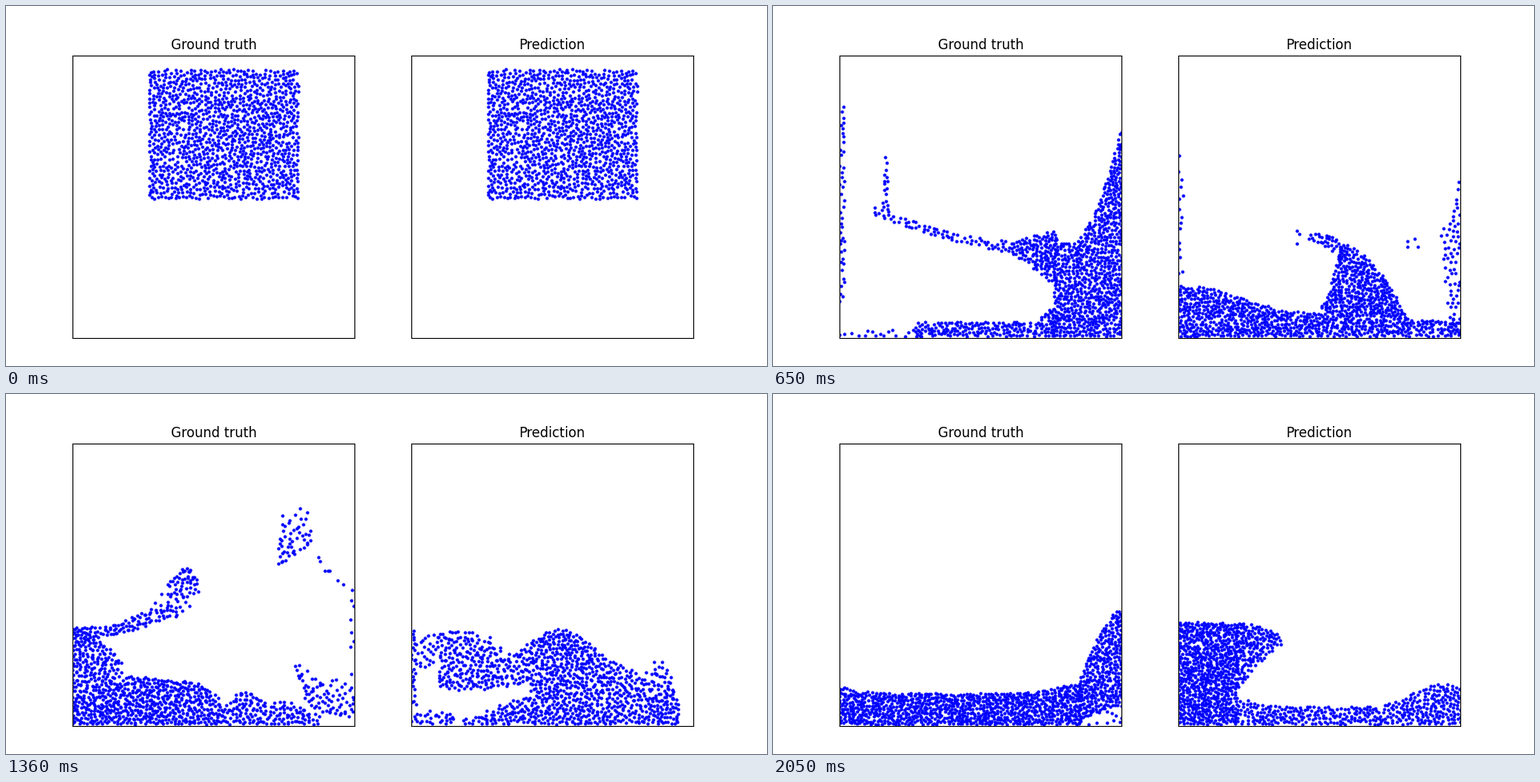
Write a matplotlib script that moves like this. It is 950 px wide and 450 px high and loops after 2100 ms.

```python
import numpy as np
import matplotlib.pyplot as plt
from matplotlib.animation import FuncAnimation

W, H, DPI = 950, 450, 100
SIDE, CEIL = 352.27, 62.36
FLOOR = CEIL + SIDE
BED = 413
COUNT = 1240
STEPS, LAST = 70, 68
GRAVITY = 1.0
rng = np.random.default_rng(7)


# A body of water is (density, x, top, bottom), sampled along x.
def slab(density, *pts):
    """Smooth curves through two or three (x, top, bottom) points."""
    px, top, bottom = np.array(pts, float).T
    x = np.linspace(px[0], px[-1], 200)
    curve = lambda y: np.polyval(np.polyfit(px, y, len(px) - 1), x)
    top = curve(top)
    return density, x, top, np.maximum(curve(bottom), top + 1)


def rect(density, x0, x1, top, bottom):
    return slab(density, (x0, top, bottom), (x1, top, bottom))


def sea(density, x0, x1, depth, *swells):
    """Water on the floor; each swell is (centre, width, rise)."""
    x = np.linspace(x0, x1, 200)
    rise = sum(r * np.exp(-((x - c) / w) ** 2) for c, w, r in swells)
    return density, x, BED - depth - rise, np.full_like(x, BED)


def area(body):
    _, x, top, bottom = body
    return (bottom - top).mean() * (x[-1] - x[0])


def scatter(body, n):
    """Throw n evenly spaced darts into a body."""
    _, x, top, bottom = body
    cdf = np.cumsum(bottom - top)
    u, v = rng.random((2, 8 * n + 8))
    px = np.interp(u, cdf / cdf[-1], x)
    hi, lo = np.interp(px, x, top), np.interp(px, x, bottom)
    darts = np.column_stack([px, hi + v * (lo - hi)])
    gap = 0.45 * area(body) / n
    out, k = np.empty((n, 2)), 0
    for d in darts:
        if k == n:
            break
        if k == 0 or ((out[:k] - d) ** 2).sum(1).min() > gap:
            out[k] = d
            k += 1
    out[k:] = darts[:n - k]
    return out


def fill(bodies):
    mass = np.array([b[0] * area(b) for b in bodies])
    n = np.maximum(1, np.round(COUNT * mass / mass.sum())).astype(int)
    n[mass.argmax()] += COUNT - n.sum()
    return np.vstack([scatter(b, k) for b, k in zip(bodies, n)])


def ranks(p):
    columns = np.array_split(np.argsort(p[:, 0]), 40)
    return np.concatenate([c[np.argsort(p[c, 1])] for c in columns])


def match(a, b):
    """Order b so that particles travel from a with few crossings."""
    out = np.empty_like(b)
    out[ranks(a)] = b[ranks(b)]
    for _ in range(1300):
        i, j = rng.permutation(COUNT).reshape(2, -1)
        cross = ((a[i] - a[j]) * (out[i] - out[j])).sum(1) < 0
        i, j = i[cross], j[cross]
        out[np.r_[i, j]] = out[np.r_[j, i]]
    return out


class Flow:
    def __init__(self, start):
        self.times, self.poses = [0], [start]

    def key(self, time, *bodies):
        self.times.append(time)
        self.poses.append(match(self.poses[-1], fill(bodies)))

    def at(self, t):
        k = min(np.searchsorted(self.times, t, "right"), len(self.times) - 1)
        t0, t1 = self.times[k - 1:k + 1]
        f = (t - t0) / (t1 - t0)
        x, y = (self.poses[k - 1] * (1 - f) + self.poses[k] * f).T
        # Airborne water follows a ballistic arc between poses.
        air = (FLOOR - y) / SIDE
        y = y - air * GRAVITY / 2 * (t - t0) * (t1 - t)
        return np.clip(x, 0, SIDE), np.clip(y, CEIL + 1, FLOOR)


block = fill([rect(1, 96, 282, 79, 241)])
truth, guess = Flow(block), Flow(block)
for flow in (truth, guess):
    flow.key(6, slab(1, (90, 64, 100), (220, 64, 170), (350, 66, 265)))

truth.key(
    13,
    slab(1, (200, 122, 162), (275, 120, 240), (352, 70, 385)),
    slab(.8, (75, 110, 117), (140, 114, 145), (200, 122, 163)),
    slab(.8, (85, 105, 118), (92, 76, 118), (99, 104, 122)),
    slab(.6, (0, 63, 98), (25, 86, 95), (66, 106, 110)),
    rect(.5, 0, 6, 95, 300),
    slab(.5, (275, 409, 413), (352, 405, 413)))
truth.key(
    21,
    slab(1, (268, 290, BED), (305, 282, BED), (352, 150, BED)),
    slab(1, (215, 297, 310), (240, 287, 326), (270, 282, 352)),
    sea(1, 95, 268, 18, (268, 15, 18)),
    slab(.4, (0, 409, 413), (95, 402, 413)),
    slab(.7, (44, 250, 262), (110, 275, 284), (217, 294, 309)),
    slab(.7, (54, 238, 256), (58, 184, 257), (62, 245, 260)),
    rect(.5, 0, 6, 125, 370))
truth.key(
    29,
    sea(1, 148, SIDE, 34, (222, 68, 42), (352, 8, 22)),
    sea(.8, 0, 148, 8, (0, 30, 10), (148, 14, 18)),
    slab(.7, (38, 382, 390), (85, 392, 399), (150, 364, 378)),
    slab(1, (0, 310, 395), (20, 302, 395), (38, 268, 392)),
    slab(.9, (38, 262, 318), (62, 241, 268), (95, 243, 256)),
    slab(.4, (95, 246, 252), (125, 264, 272), (175, 326, 330)))
truth.key(
    37,
    sea(1, 0, SIDE, 8, (40, 90, 40), (175, 75, 36)),
    slab(.9, (0, 270, 365), (20, 282, 365), (45, 348, 362)),
    slab(.9, (0, 266, 284), (70, 248, 260), (132, 203, 215)),
    slab(.9, (130, 203, 218), (155, 155, 180), (172, 136, 160)),
    slab(.9, (172, 134, 158), (200, 133, 146), (245, 138, 145)),
    slab(.3, (245, 140, 144), (350, 221, 225)),
    rect(.1, 346, 352, 225, 400))
truth.key(
    53,
    sea(1, 0, 195, 8, (15, 80, 68), (115, 48, 66)),
    sea(.75, 195, 334, 12, (240, 25, 18), (315, 25, 14)),
    slab(.9, (334, 375, 388), (342, 270, 388), (352, 186, 400)))
truth.key(
    LAST,
    sea(1, 0, 300, 39, (0, 30, 7), (300, 40, 12)),
    slab(.85, (298, 360, 412), (330, 290, 394), (352, 266, 390)),
    rect(.2, 310, 352, 396, 413))

guess.key(
    13,
    rect(.65, 0, 8, 77, 413),
    slab(1, (8, 178, 306), (25, 205, 298), (46, 270, 290)),
    slab(.6, (50, 270, 295), (140, 312, 360), (275, 352, 380)),
    sea(1.15, 272, SIDE, 56, (352, 28, 28)),
    rect(.85, 333, 352, 120, 330), rect(.6, 346, 352, 80, 120),
    slab(.4, (293, 130, 135), (333, 122, 128)),
    sea(.9, 55, 272, 11, (55, 14, 25)),
    slab(.6, (54, 370, 402), (70, 346, 372), (100, 349, 353)))
guess.key(
    21,
    sea(1, 0, 175, 29, (20, 80, 33)),
    slab(1, (175, 380, BED), (190, 350, BED), (203, 297, BED)),
    slab(1, (203, 297, BED), (250, 330, BED), (288, 395, BED)),
    slab(.85, (163, 283, 292), (185, 286, 302), (203, 294, 318)),
    sea(.9, 288, SIDE, 20, (352, 9, 3)),
    slab(.35, (328, 268, 285), (338, 270, 392), (352, 200, 392)),
    rect(.25, 0, 6, 186, 352), rect(.3, 144, 152, 280, 302),
    rect(.3, 282, 302, 291, 302))
guess.key(
    29,
    sea(.85, 0, 200, 9, (200, 75, 36)),
    slab(.9, (136, 264, 318), (175, 271, 328), (200, 276, 348)),
    slab(1, (198, 274, BED), (235, 286, BED), (272, 330, BED)),
    slab(.8, (272, 325, 372), (302, 350, 358)),
    slab(.6, (272, 388, 413), (352, 411, 413)),
    rect(.7, 3, 36, 279, 300), rect(.6, 47, 77, 267, 282),
    slab(.7, (98, 258, 280), (136, 265, 278)))
guess.key(
    37,
    slab(1, (190, 278, BED), (250, 293, BED), (315, 395, BED)),
    slab(.7, (62, 308, 354), (125, 296, 348), (190, 278, 338)),
    slab(.6, (8, 312, 328), (62, 306, 324)),
    sea(.9, 105, 190, 1, (195, 45, 46)),
    rect(.6, 0, 82, 403, 413), rect(.4, 0, 8, 290, 400))
guess.key(
    53,
    sea(1, 0, SIDE, 26, (15, 34, 80), (160, 62, 54), (355, 30, 34)))
guess.key(
    LAST,
    rect(1.1, 0, 74, 285, BED),
    slab(.9, (74, 287, 370), (100, 290, 337), (128, 302, 314)),
    sea(.75, 74, SIDE, 22, (74, 30, 10), (330, 48, 30)))

fig = plt.figure(figsize=(W / DPI, H / DPI), dpi=DPI, facecolor="white")


def panel(left, title):
    ax = fig.add_axes([left / W, 1 - FLOOR / H, SIDE / W, SIDE / H])
    ax.set(xlim=(0, SIDE), ylim=(FLOOR, CEIL), xticks=[], yticks=[])
    ax.set_title(title, fontsize=12, family="DejaVu Sans")
    return ax.plot([], [], "o", ms=2, color="blue")[0]


views = [(truth, panel(83, "Ground truth")),
         (guess, panel(83 + 1.2 * SIDE, "Prediction"))]


def draw(i):
    for flow, dots in views:
        dots.set_data(*flow.at(min(i, LAST)))
    return [dots for _, dots in views]


anim = FuncAnimation(fig, draw, frames=STEPS, interval=30, repeat=True,
                     repeat_delay=0)
plt.show()
```
